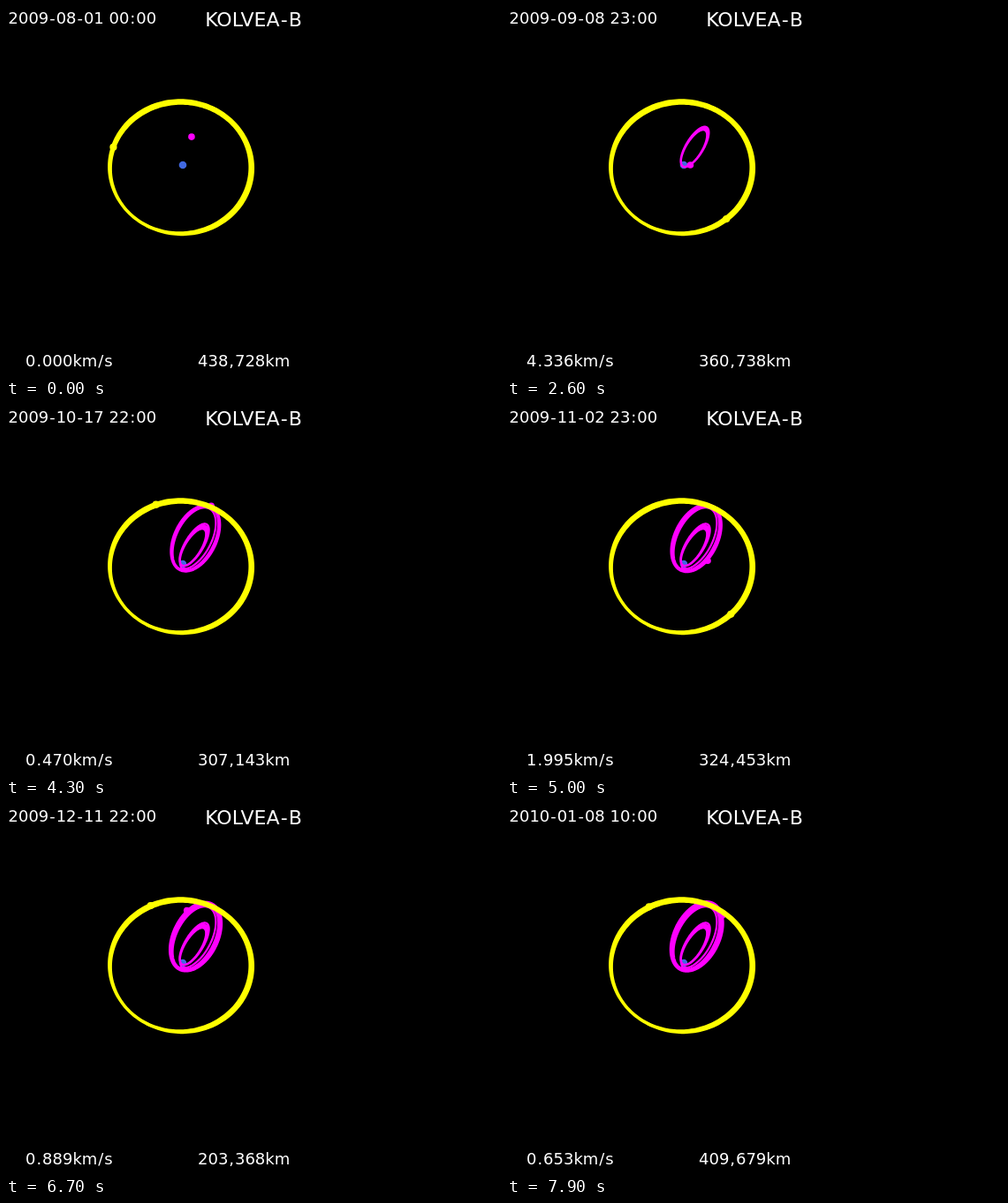
An HTML page with a canvas for the animation above (8000 ms loop, 560 by 420 pixels).

```html
<!DOCTYPE html>
<html lang="en">
<head>
<meta charset="utf-8">
<title>Orbit animation</title>
<style>
  html, body { margin: 0; width: 100%; height: 100%; overflow: hidden; background: #000; }
  #stage { position: relative; width: 560px; height: 420px; overflow: hidden; }
  canvas { position: absolute; left: 0; top: 0; }
  p { position: absolute; margin: 0; color: #fff; white-space: pre;
      font: 18px/1 "DejaVu Sans", sans-serif; }
  p i { font-style: normal; margin: 0 .052em; }
  #title { left: 0; width: 560px; top: 4.6px; font-size: 22px; text-align: center; }
  #date { left: 2.5px; top: 4.6px; }
  #speed { left: 22px; top: 393px; }
  #distance { left: 217px; top: 393px; }
</style>
</head>
<body>
<div id="stage">
  <canvas id="view" width="560" height="420"></canvas>
  <p id="date"></p>
  <p id="title">KOLVEA<i>-</i>B</p>
  <p id="speed"></p>
  <p id="distance"></p>
</div>
<script>
const ctx = document.getElementById('view').getContext('2d');
const TAU = Math.PI * 2, RAD = Math.PI / 180;
const LOOP = 8000, HOLD = 1000, STEP = 100, LAST = 70;
const HOURS_PER_STEP = 55, MU = 398600;
const START = Date.UTC(2009, 7, 1);
const EARTH = { x: 200, y: 180 };
const RAISE = 19.4;   // step at which the orbit is raised
const SAMPLES = 200;

// Revolutions done by step s, their rate, and the shape of the ellipse
function orbitAt(s) {
  if (s < RAISE) {
    const k = s / RAISE;
    return {
      revs: .812 + 9.719 * k - .531 * k ** 4,
      rate: (9.719 - 2.124 * k ** 3) / RAISE,
      e: .925, apogee: 58.5 * RAD
    };
  }
  const u = s - RAISE, p = .945, scale = .2777;
  return {
    revs: 10 + scale * u ** p,
    rate: scale * p * Math.max(u, .1) ** (p - 1),
    e: .79 + .07 * Math.exp(-u / 8), apogee: 64 * RAD
  };
}

function craftAt(s) {
  const { revs, rate, e, apogee } = orbitAt(s);
  const a = 40.3 * (.2287 / rate) ** (2 / 3);   // Kepler's third law
  const M = (revs % 1) * TAU;
  let E = Math.PI;
  for (let i = 0; i < 12; i++) E -= (E - e * Math.sin(E) - M) / (1 - e * Math.cos(E));
  const along = a * (e - Math.cos(E));
  const across = -a * Math.sqrt(1 - e * e) * Math.sin(E);
  const c = Math.cos(apogee), n = Math.sin(apogee);
  return {
    x: EARTH.x + along * c - across * n,
    y: EARTH.y - along * n - across * c,
    r: a * (1 - e * Math.cos(E)),
    a
  };
}

function moonAt(s) {
  const mean = 159.6 + 13.176 * s * HOURS_PER_STEP / 24;
  const angle = (mean + 4 * Math.sin(mean * RAD) - Math.cos(mean * RAD)) * RAD;
  return { x: 197.5 + 80 * Math.cos(angle), y: 183 - 75 * Math.sin(angle) };
}

function gapAt(s) {
  const c = craftAt(s), m = moonAt(s);
  return Math.hypot(c.x - m.x, c.y - m.y);
}

const KM_PER_PX = 438728 / gapAt(0);

function speedAt(s) {
  const { r, a } = craftAt(s);
  return s ? Math.sqrt(MU / KM_PER_PX * (2 / r - 1 / a)) : 0;
}

const trail = Array.from({ length: LAST * SAMPLES + 1 }, (_, i) => craftAt(i / SAMPLES));

// The moon's path is a band of uneven thickness
const ring = new Path2D();
for (const side of [1, -1]) {
  for (let d = 0; d < 360; d += 2) {
    const c = Math.cos(d * RAD), n = Math.sin(d * RAD);
    const half = (5.7 + .9 * c + .8 * n - 1.8 * n * c) / 2 * side;
    ring[d ? 'lineTo' : 'moveTo'](197.6 + (80.1 + half) * c, 183.1 - (74.6 + half) * n);
  }
  ring.closePath();
}

function dot({ x, y }, radius, color) {
  ctx.fillStyle = color;
  ctx.beginPath();
  ctx.arc(x, y, radius, 0, TAU);
  ctx.fill();
}

function write(id, text) {
  document.getElementById(id).innerHTML = text.replace(/[-:.,\/]/g, '<i>$&</i>');
}

function draw(s) {
  ctx.fillStyle = '#000';
  ctx.fillRect(0, 0, 560, 420);
  dot(EARTH, 4.3, '#4169e1');

  ctx.strokeStyle = '#f0f';
  ctx.lineWidth = 2.2;
  ctx.lineJoin = 'round';
  ctx.beginPath();
  for (let i = 0; i <= s * SAMPLES; i++) ctx.lineTo(trail[i].x, trail[i].y);
  ctx.stroke();
  dot(craftAt(s), 3.8, '#f0f');

  ctx.fillStyle = '#ff0';
  ctx.fill(ring, 'evenodd');
  dot(moonAt(s), 4.1, '#ff0');

  const date = new Date(START + s * HOURS_PER_STEP * 3600000).toISOString();
  write('date', date.slice(0, 16).replace('T', ' '));
  write('speed', speedAt(s).toFixed(3) + 'km/s');
  write('distance', Math.round(gapAt(s) * KM_PER_PX).toLocaleString('en-US') + 'km');
}

const begin = performance.now();
let shown = -1;
function tick() {
  const t = (performance.now() - begin) % LOOP;
  const s = t < HOLD ? 0 : Math.min(LAST, Math.floor((t - HOLD) / STEP) + 1);
  if (s !== shown) draw(shown = s);
  requestAnimationFrame(tick);
}
tick();
</script>
</body>
</html>
```
